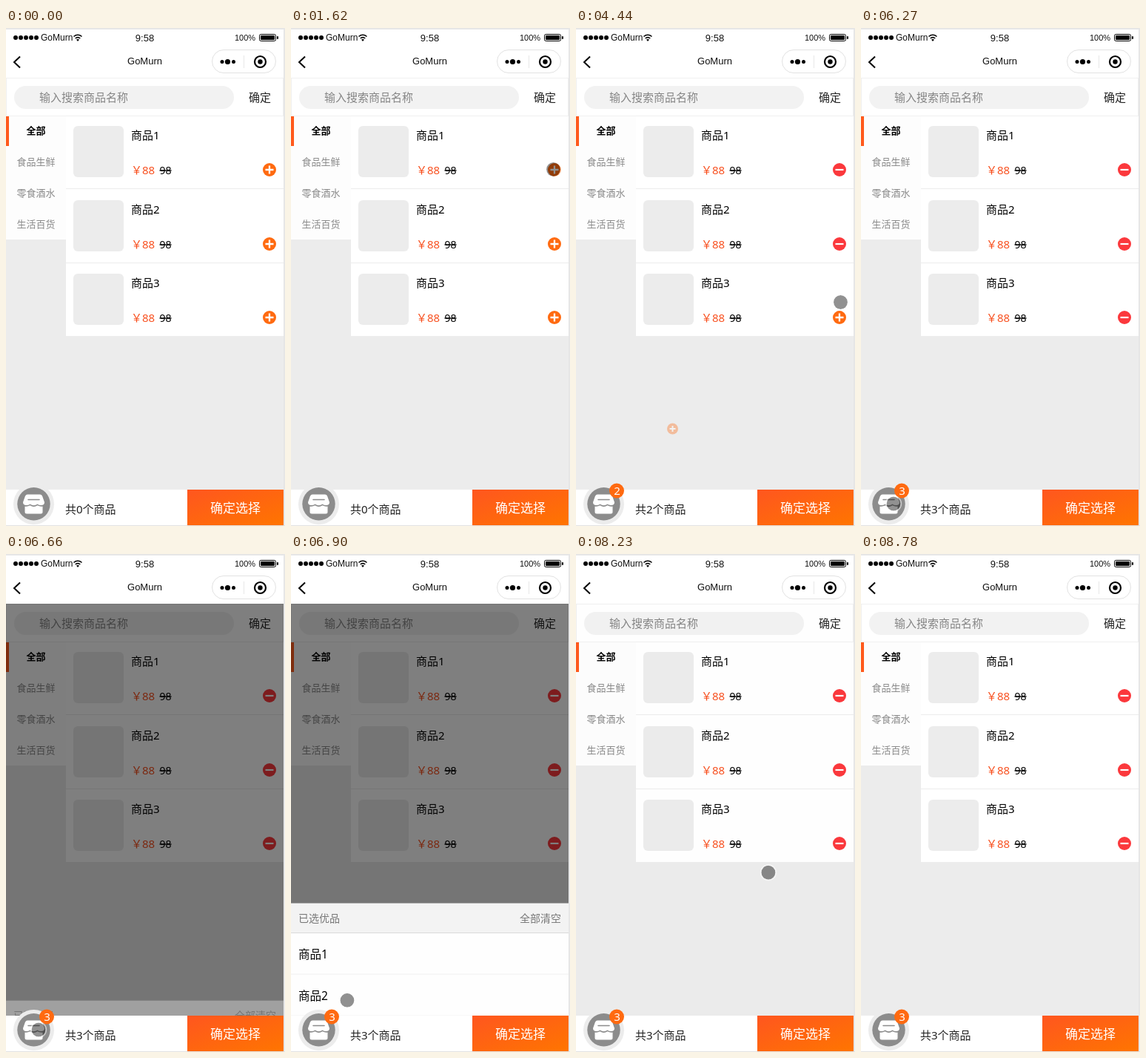
Recreate the animation shown at these times as an HTML page. Size 377 px wide and 671 px high, loop 9590 ms.

```html
<!DOCTYPE html>
<html lang="zh-CN">
<head>
<meta charset="utf-8">
<title>商品选择</title>
<style>
html, body { margin: 0; width: 100%; height: 100%; overflow: hidden; background: #ececec; }
svg { display: block; font-family: "Noto Sans", "Noto Sans CJK SC", "Noto Sans CJK", sans-serif; }
.latin { font-family: "Liberation Sans", Arial, sans-serif; }
</style>
</head>
<body>
<svg id="stage" width="377" height="671" viewBox="0 0 377 671"></svg>
<script>
const LOOP = 9590;
const ORANGE = '#ff6a10';
const GREY = '#ececec';

// Bursts of motion: start, end, number of visible steps
const BURSTS = [
  [870, 1620, 7], [2550, 3000, 4], [3400, 3860, 4], [4170, 4860, 6],
  [5390, 6270, 7], [6660, 7560, 8], [7970, 8780, 7]
];

// Pointer path: time, x, y
const PATH = [
  [870, 235, 645], [1620, 354.5, 190.5], [2550, 354.5, 190.5], [2700, 367, 160],
  [3000, 338, 293], [3400, 338, 293], [3860, 354, 293], [4170, 354, 293],
  [4440, 357.5, 369.5], [5390, 357.5, 369.5], [5537, 356, 388], [5683, 354, 390],
  [6270, 44, 641], [6660, 44, 641], [7560, 267.5, 363.5], [8100, 267.5, 363.5],
  [8700, 235, 645]
];
const POINTER_OUT = 8770;

const ROWS = [
  { y: 191, click: 2550 },
  { y: 291, click: 4170 },
  { y: 390, click: 5537 }
];
const FLIGHT = 388;
const CART = { x: 39, y: 641 };
const PANEL = { open: 6645, close: 7960, time: 300, travel: 208 };

const rect = (x, y, w, h, fill, extra = '') =>
  `<rect x="${x}" y="${y}" width="${w}" height="${h}" fill="${fill}" ${extra}/>`;
const disc = (x, y, r, fill, extra = '') =>
  `<circle cx="${x}" cy="${y}" r="${r}" fill="${fill}" ${extra}/>`;
const line = (d, color, w, extra = '') =>
  `<path d="${d}" fill="none" stroke="${color}" stroke-width="${w}" ${extra}/>`;
const text = (x, y, size, fill, str, extra = '') =>
  `<text x="${x}" y="${y}" font-size="${size}" fill="${fill}" ${extra}>${str}</text>`;
const MID = 'text-anchor="middle"';
const ROUND = 'stroke-linecap="round" stroke-linejoin="round"';

const plus = (r, arm, w) =>
  disc(0, 0, r, ORANGE) + line(`M${-arm} 0H${arm}M0 ${-arm}V${arm}`, '#fff', w);
const minus = () => disc(0, 0, 9, '#fb383c') + line('M-5.5 0H5.5', '#fff', 2.2);

function header() {
  let s = rect(0, 2, 375, 65, '#fff');
  for (let i = 0; i < 5; i++) s += disc(13 + i * 7, 13, 3, '#000');
  s += text(47, 17, 12, '#111', 'GoMurn', 'class="latin"');
  s += line('M91.5 11.5Q97 7 102.5 11.5M93.7 14Q97 11.3 100.3 14', '#000', 1.6);
  s += '<path d="M95 15.6Q97 14.2 99 15.6L97 18Z"/>';
  s += text(187.5, 17.5, 13, '#111', '9:58', `class="latin" ${MID}`);
  s += text(309, 17, 11, '#111', '100%', 'class="latin"');
  s += rect(342.5, 8.5, 22, 9, '#fff', 'rx="2" stroke="#000"');
  s += rect(344, 10, 19, 6, '#000', 'rx="1"') + rect(366, 11, 2, 4, '#000', 'rx="1"');
  s += line('M19 38.5L11 46L19 53.5', '#000', 2);
  s += text(187.5, 49, 13, '#111', 'GoMurn', `class="latin" ${MID}`);
  s += rect(278.5, 29.5, 86, 31, '#fff', 'rx="15.5" stroke="#e2e2e2"');
  s += line('M321.5 37V54', '#e8e8e8', 1);
  s += disc(292, 45.5, 2.5, '#000') + disc(299.5, 45.5, 3.6, '#000') + disc(307.5, 45.5, 2.5, '#000');
  s += disc(343.5, 45.5, 7.5, 'none', 'stroke="#000" stroke-width="2.2"') + disc(343.5, 45.5, 3.2, '#000');
  return s;
}

function search() {
  return rect(0.5, 67.5, 374, 51, '#fff', 'stroke="#f0f0f0"') +
    rect(11, 78, 297, 31, '#f2f2f2', 'rx="15.5"') +
    text(45, 99, 15, '#858585', '输入搜索商品名称') +
    text(328, 99, 15, '#222', '确定');
}

function sidebar() {
  let s = rect(0, 119, 81, 166, '#fdfdfd') + rect(0, 119, 4, 40, '#ff5a1c');
  ['全部', '食品生鲜', '零食酒水', '生活百货'].forEach((name, i) => {
    s += text(40.5, 143 + i * 42, 13, i ? '#888' : '#000', name,
      `${MID} font-weight="${i ? 400 : 700}"`);
  });
  return s;
}

function goods() {
  let s = rect(81, 119, 294, 296, '#fff');
  ROWS.forEach(({ y }, i) => {
    s += rect(91, y - 59, 68, 69, GREY, 'rx="6"');
    s += text(169, y - 41, 15, '#000', `商品${i + 1}`);
    s += text(169, y + 6, 15, '#f8501f', '￥88');
    s += text(207.5, y + 6, 14, '#000', '98', 'text-decoration="line-through"');
    if (i < 2) s += rect(81, y + 25, 294, 1, GREY);
    s += `<g transform="translate(356 ${y})"><g id="add${i}">${plus(9, 5.5, 2.3)}</g>` +
      `<g id="del${i}">${minus()}</g></g>`;
  });
  return s;
}

function panel() {
  let s = rect(0, 414, 375, 40, '#f3f3f3') + rect(0, 454, 375, 168, '#fefefe');
  s += text(10, 439, 14, '#777', '已选优品') + text(309, 439, 14, '#777', '全部清空');
  for (let i = 0; i < 3; i++) {
    s += text(10, 488 + i * 56, 15.5, '#000', `商品${i + 1}`);
    if (i < 2) s += rect(0, 509 + i * 56, 375, 1, '#f0f0f0');
  }
  return s;
}

function bar() {
  return rect(0, 622, 375, 48, '#fff') +
    text(80, 654, 15, '#222', '', 'id="total"') +
    rect(245, 622, 130, 48, 'url(#warm)') +
    text(310, 653, 17, '#fff', '确定选择', MID) +
    disc(37.5, 641.5, 27.5, GREY) + disc(37.5, 641.2, 22.2, '#8c8c8c') +
    '<path d="M29 628.5H46Q48 628.5 49 630.5L52 639Q52 643 47.5 643Q44.5 643 42.5 641.5' +
    'Q37.5 645 32.5 641.5Q30.5 643 27.5 643Q23 643 23 639L26 630.5Q27 628.5 29 628.5Z" fill="#fff"/>' +
    '<path d="M25.5 644.6Q29.500 645 32.5 643.3Q37.5 646.5 42.5 643.3Q45.5 645 49.5 644.6V652' +
    'Q49.5 654.500 47 654.500H28Q25.5 654.500 25.5 652Z" fill="#fff"/>' +
    line('M30 635.5H45', '#8c8c8c', 1.6, ROUND) +
    `<g id="badge">${disc(55, 623.5, 10, ORANGE)}${text(55.5, 629, 15, '#fff', '', `id="count" ${MID}`)}</g>`;
}

const stage = document.getElementById('stage');
stage.innerHTML =
  '<defs><linearGradient id="warm" x2="1" y2="1"><stop stop-color="#ff561f"/><stop offset="1" stop-color="#ff7500"/></linearGradient></defs>' +
  rect(0, 0, 377, 671, GREY) + header() + search() + sidebar() + goods() +
  rect(0, 67, 375, 555, '#000', 'id="mask"') +
  `<g id="panel">${panel()}</g>` + bar() +
  `<g id="ball">${plus(7.5, 4, 2)}</g>` +
  `<g id="pointer">${disc(0, 0, 9.5, '#000', 'fill-opacity=".43"')}` +
  `${disc(0, 0, 10.3, 'none', 'stroke="#fff" stroke-opacity=".5" stroke-width="1.8"')}</g>` +
  rect(0, 0, 377, 2, '#e6e6e6') + rect(375, 0, 2, 671, '#e6e6e6') + rect(0, 670, 377, 1, '#e2e2e2');

const $ = id => document.getElementById(id);
const clamp = v => Math.max(0, Math.min(1, v));
const easeOut = u => 1 - (1 - u) ** 2;
const mix = (a, b, p) => a + (b - a) * p;
const show = (id, on) => $(id).setAttribute('visibility', on ? 'visible' : 'hidden');
const move = (id, x, y) => $(id).setAttribute('transform', `translate(${x} ${y})`);
const fade = (id, v) => $(id).setAttribute('opacity', v);

function stepped(t) {
  for (const [a, b, n] of BURSTS) {
    if (t < a || t >= b) continue;
    const d = (b - a) / (n - 1);
    return a + Math.floor((t - a + 12) / d) * d;
  }
  return t;
}

function pointerAt(t) {
  const i = PATH.findIndex(k => k[0] > t);
  if (i < 0) return PATH[PATH.length - 1].slice(1);
  if (i === 0) return PATH[0].slice(1);
  const [t0, x0, y0] = PATH[i - 1], [t1, x1, y1] = PATH[i];
  const p = (t - t0) / (t1 - t0);
  return [mix(x0, x1, p), mix(y0, y1, p)];
}

function draw(now) {
  const t = stepped(now % LOOP);

  const count = ROWS.filter(r => t >= r.click).length;
  ROWS.forEach((r, i) => {
    show('add' + i, t < r.click);
    show('del' + i, t >= r.click);
  });
  $('total').textContent = `共${count}个商品`;
  $('count').textContent = count;
  show('badge', count > 0);

  const flying = ROWS.find(r => t > r.click && t < r.click + FLIGHT);
  show('ball', flying);
  if (flying) {
    const p = (t - flying.click) / FLIGHT;
    move('ball', mix(356, CART.x, p), mix(flying.y, CART.y, p));
    fade('ball', 1 - p * 0.9);
  }

  const opened = easeOut(clamp((t - PANEL.open) / PANEL.time));
  const closed = easeOut(clamp((t - PANEL.close) / PANEL.time));
  const p = opened * (1 - closed);
  show('panel', p > 0);
  move('panel', 0, PANEL.travel * (1 - p));
  fade('panel', Math.min(1, p * 3.5));
  fade('mask', t < PANEL.open ? 0 : 0.5 * (1 - closed));

  show('pointer', t >= PATH[0][0] && t < POINTER_OUT);
  move('pointer', ...pointerAt(t));
}

const start = performance.now();
function tick() {
  draw(performance.now() - start);
  requestAnimationFrame(tick);
}
tick();
</script>
</body>
</html>
```
